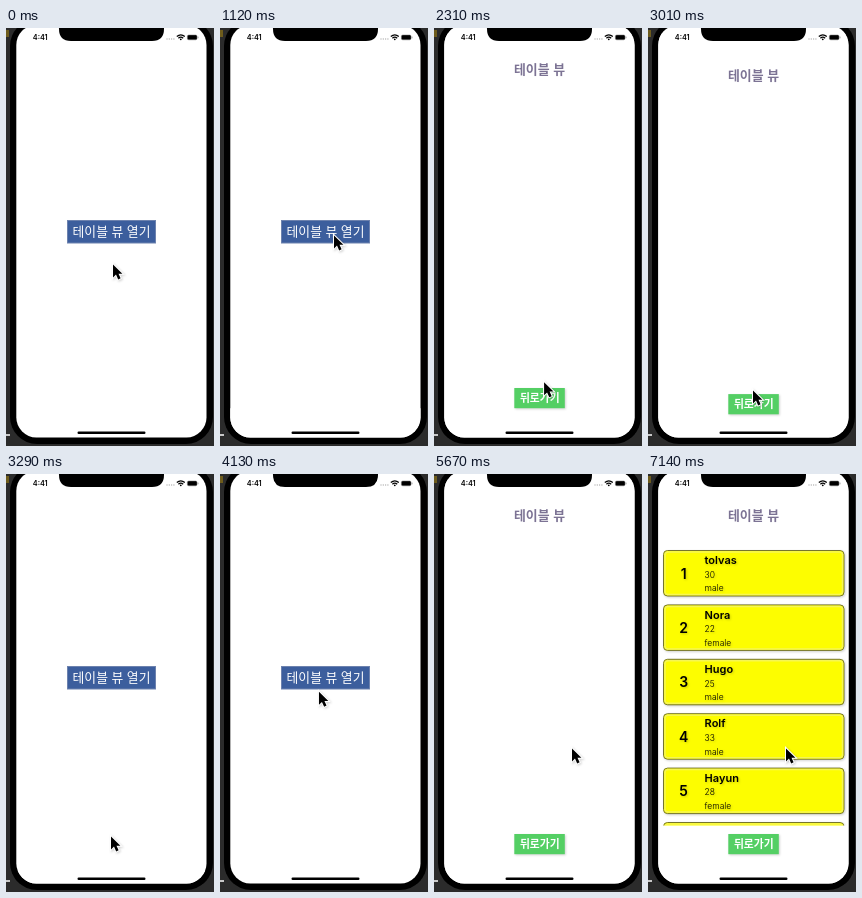
Animation of 208 by 418 pixels, one loop 8 s. Source, as an HTML page:

```html
<!DOCTYPE html>
<html lang="ko">
<head>
<meta charset="utf-8">
<title>테이블 뷰</title>
<style>
  html, body { margin: 0; width: 100%; height: 100%; overflow: hidden; background: #2b2b2b; }
  svg { display: block; width: 100vw; height: 100vh; }
  text { font-family: Inter, "Noto Sans CJK KR", "Noto Sans CJK", sans-serif; }
  .ko { font-family: "Noto Sans CJK KR", "Noto Sans CJK", sans-serif; text-anchor: middle; }
  .open { font-size: 12.8px; fill: #fff; }
  .title { font-size: 12.9px; font-weight: 700; fill: #7c7394; }
  .back { font-size: 10.8px; font-weight: 700; fill: #fff; }
  .clock { font-size: 7.3px; font-weight: 600; }
  .num { font-size: 14px; font-weight: 600; text-anchor: middle; }
  .name { font-size: 11px; font-weight: 600; }
  .info { font-size: 8.5px; font-weight: 300; }
  .cell { fill: #fdfd00; stroke: #75752c; }
  .glow { fill: none; stroke: #f4f478; stroke-width: 1.5; opacity: .7; }
  .soft { filter: drop-shadow(1px 1px 1px rgba(0, 0, 0, .18)); }
</style>
</head>
<body>
<svg viewBox="0 0 208 418">
  <defs>
    <clipPath id="screen"><rect x="10.3" y="-3" width="190.2" height="412.4" rx="20"/></clipPath>
    <clipPath id="list"><rect x="10" y="70" width="191" height="281.5"/></clipPath>
  </defs>

  <rect width="208" height="418" fill="#2b2b2b"/>
  <rect y="2" width="3" height="7" fill="#6e5c1c"/>
  <rect y="406" width="4" height="2" fill="#c8c8c8"/>
  <rect x="4" y="-9" width="203" height="425" rx="27" fill="#000"/>

  <g clip-path="url(#screen)">
    <rect y="-3" width="208" height="413" fill="#fff"/>
    <rect x="61.5" y="192.5" width="88" height="22.5" fill="#3c5e9d" stroke="#6d82ae"/>
    <text class="ko open" x="105.5" y="208.4">테이블 뷰 열기</text>

    <g id="sheet">
      <rect y="-3" width="208" height="413" fill="#fff"/>
      <text class="ko title" x="105.5" y="46.4">테이블 뷰</text>
      <g id="rows" clip-path="url(#list)"></g>
      <rect class="soft" x="80.3" y="360" width="50.5" height="20.2" fill="#54cf64"/>
      <text class="ko back" x="105.8" y="374.1">뒤로가기</text>
    </g>

    <path d="M48-3Q53-3 53 1Q53 13 65 13H146Q158 13 158 1Q158-3 163-3Z"/>
    <text class="clock" x="26.8" y="12">4:41</text>
    <g fill="#b5b5b5">
      <circle cx="161" cy="11" r=".7"/><circle cx="163.3" cy="11" r=".7"/>
      <circle cx="165.6" cy="11" r=".7"/><circle cx="167.9" cy="11" r=".7"/>
    </g>
    <path d="M170.8 8.6Q174.8 5.2 178.8 8.6M172.4 10.2Q174.8 8.2 177.2 10.2" fill="none" stroke="#000" stroke-width="1.3"/>
    <circle cx="174.8" cy="11.3" r=".9"/>
    <rect x="181.4" y="7" width="9.6" height="4.8" rx="1.4" stroke="#777" stroke-width=".5"/>
    <rect x="191.6" y="8.6" width=".8" height="1.7" fill="#888"/>
    <rect x="71.5" y="403.5" width="68" height="2.4" rx="1.2"/>
  </g>

  <g id="cursor">
    <path class="soft" d="M0 .4V13.4L3 10.6L5.2 15.4L7.6 14.3L5.5 9.7H9.4Z" stroke="#fff" stroke-width="2" paint-order="stroke"/>
  </g>
</svg>

<script>
  const LOOP = 8000, STEP = 70, HEIGHT = 413, TABLE_AT = 7140;
  const SHOW = 1096, HIDE = 3000, SHOW_AGAIN = 4483;
  const people = [
    ["tolvas", 30, "male"], ["Nora", 22, "female"], ["Hugo", 25, "male"],
    ["Rolf", 33, "male"], ["Hayun", 28, "female"], ["", "", ""]
  ];
  const home = { x: 107, y: 236 };
  // Pointer moves: each eases out with a sideways bend
  const moves = [
    { from: 0, to: 350, x: 114, y: 207, bend: 0, power: 1.5 },
    { from: 1610, to: 2730, x: 105, y: 362, bend: 5, power: 3 },
    { from: 3360, to: 4270, x: 105, y: 208, bend: -13, power: 1.5 },
    { from: 4900, to: 5670, x: 138, y: 274, bend: 16, power: 1.1 }
  ];
  const $ = id => document.getElementById(id);
  const sheet = $("sheet"), rows = $("rows"), cursor = $("cursor");

  rows.innerHTML = people.map(([name, age, sex], i) => `
    <g transform="translate(0 ${i * 54.4})">
      <rect class="cell soft" x="15.5" y="76.5" width="180.5" height="45.5" rx="4"/>
      <rect class="glow" x="17" y="78" width="177.5" height="42.5" rx="3"/>
      <g class="soft">
        <text class="num" x="35.6" y="104.6">${i < 5 ? i + 1 : ""}</text>
        <text class="name" x="56.6" y="90.2">${name}</text>
        <text class="info" x="56.6" y="103.8">${age}</text>
        <text class="info" x="56.6" y="117.4">${sex}</text>
      </g>
    </g>`).join("");

  // Critically damped spring: share of the way still to go
  function rest(ms) {
    const k = Math.max(0, ms) * 0.01826;
    return (1 + k) * Math.exp(-k);
  }

  function sheetY(t) {
    if (t >= SHOW_AGAIN) return HEIGHT * rest(t - SHOW_AGAIN);
    if (t >= HIDE) return HEIGHT * (1 - rest(t - HIDE));
    return HEIGHT * rest(t - SHOW);
  }

  function tip(t) {
    let { x, y } = home;
    for (const m of moves) {
      const p = Math.min(1, Math.max(0, (t - m.from) / (m.to - m.from)));
      const e = 1 - (1 - p) ** m.power;
      x += (m.x - x) * e + m.bend * Math.sin(Math.PI * p);
      y += (m.y - y) * e;
    }
    return [x, y];
  }

  function place(el, x, y) {
    el.setAttribute("transform", `translate(${x.toFixed(2)} ${y.toFixed(2)})`);
  }

  const start = performance.now();
  function tick() {
    const now = performance.now() - start + 0.5;
    const t = Math.floor((now % LOOP) / STEP) * STEP;
    place(sheet, 0, sheetY(t));
    place(cursor, ...tip(t));
    rows.style.display = t >= TABLE_AT ? "" : "none";
    requestAnimationFrame(tick);
  }
  tick();
</script>
</body>
</html>
```
